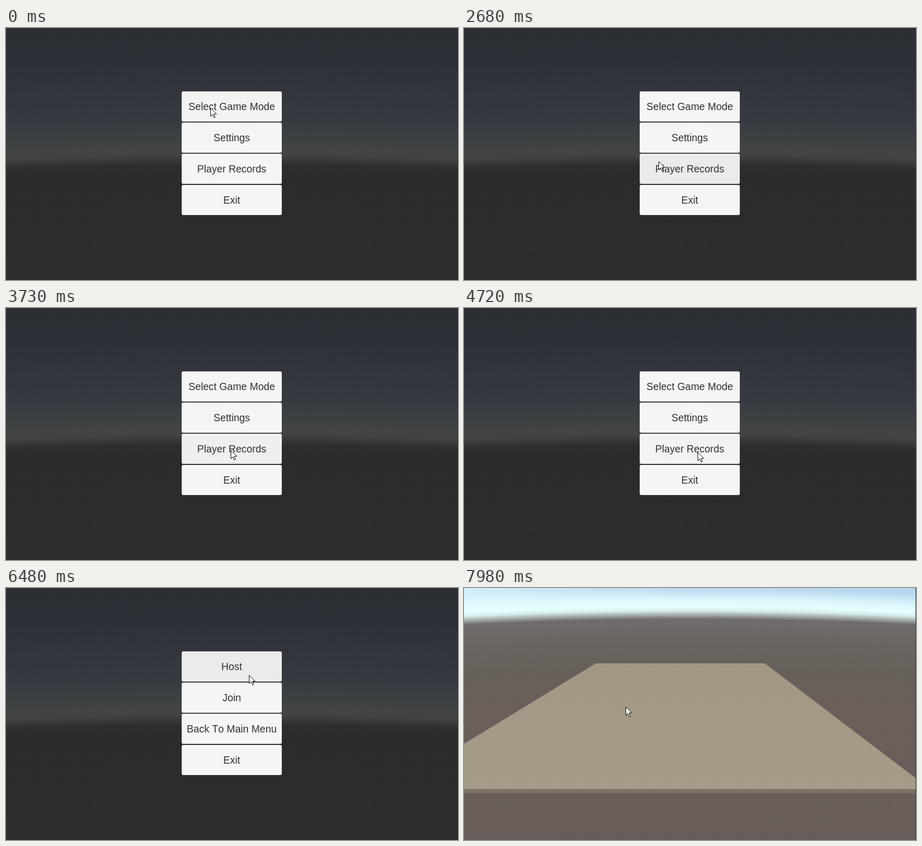
These frames come from a looping animation (867 by 485 pixels, 8000 ms). An HTML page with a canvas:

```html
<!DOCTYPE html>
<html lang="en">
<head>
<meta charset="utf-8">
<title>Game menu</title>
<style>
  html, body { margin: 0; width: 100%; height: 100%; overflow: hidden; background: #2c2b2b; }
  canvas { display: block; }
</style>
</head>
<body>
<canvas id="stage" width="867" height="485"></canvas>
<script>
const W = 867, H = 485, LOOP = 8000;
const FIRST_MOVE = 370, STEP = 76;
const ctx = document.getElementById('stage').getContext('2d');

const BUTTON = { x: 337, y: 122, w: 192, h: 58, pitch: 60.1 };
const MAIN = ['Select Game Mode', 'Settings', 'Player Records', 'Exit'];
const MODES = ['Host', 'Join', 'Back To Main Menu', 'Exit'];
const panel = title => [null, title, 'Back To Main Menu', null];

// The step at which a screen opens and its buttons (no buttons = game scene).
const SCREENS = [
  { opened: 0, labels: MAIN },
  { opened: 2, labels: MODES },
  { opened: 29, labels: MAIN },
  { opened: 36, labels: panel('Settings') },
  { opened: 44, labels: MAIN },
  { opened: 52, labels: panel('Player Records') },
  { opened: 58, labels: MAIN },
  { opened: 78, labels: MODES },
  { opened: 85 }
];

// Turning points of the pointer: step, x, y.
const PATH = [
  [0, 392, 153], [9, 405, 147], [19, 434, 228], [23, 440, 329], [31, 373, 256],
  [36, 405, 220], [45, 431, 273], [58, 448, 277], [64, 445, 336], [71, 415, 147],
  [81, 466, 167], [93, 356, 141], [97, 218, 190], [101, 310, 228]
];

const stepAt = t => Math.max(0, Math.floor((t - FIRST_MOVE) / STEP) + 1);
const screenAt = step => SCREENS.filter(s => s.opened <= step).pop();
const buttonTop = i => Math.round(BUTTON.y + i * BUTTON.pitch);
const smooth = k => k * k * (3 - 2 * k);

function pointerAt(step) {
  const next = Math.max(1, PATH.findIndex(p => p[0] >= step));
  const [s0, x0, y0] = PATH[next - 1], [s1, x1, y1] = PATH[next];
  const e = smooth((step - s0) / (s1 - s0));
  return [x0 + (x1 - x0) * e, y0 + (y1 - y0) * e];
}

function isOver(i, step) {
  const [x, y] = pointerAt(step), top = buttonTop(i);
  return x >= BUTTON.x && x <= BUTTON.x + BUTTON.w && y >= top && y <= top + BUTTON.h;
}

// Hover colour fades in and out over three steps.
function hoverLevel(i, step, opened) {
  return [0.2, 0.4, 0.4].reduce((sum, weight, back) =>
    sum + (step - back >= opened && isOver(i, step - back) ? weight : 0), 0);
}

// A vertical gradient whose horizon sinks towards the sides.
function makeBackdrop(sag, stops) {
  const canvas = document.createElement('canvas');
  canvas.width = W;
  canvas.height = H;
  const c = canvas.getContext('2d');
  for (let x = 0; x < W; x++) {
    const shift = sag * (2 * x / W - 1) ** 2;
    const g = c.createLinearGradient(0, shift, 0, H + shift);
    for (const y in stops) g.addColorStop(y / H, stops[y]);
    c.fillStyle = g;
    c.fillRect(x, 0, 1, H);
  }
  return canvas;
}

const menuBackdrop = makeBackdrop(9, {
  0: '#2b2e33', 60: '#2d3037', 180: '#373a41', 228: '#414443',
  244: '#414443', 263: '#2e2d2d', 285: '#2c2b2b', 485: '#2e2c2d'
});

const sceneBackdrop = makeBackdrop(11, {
  0: '#b8d6ee', 22: '#dcf6fd', 36: '#e5ffff', 44: '#d6eaea',
  60: '#706c6c', 110: '#69645f', 160: '#67605a', 230: '#6a5f5b', 485: '#685e59'
});

function fillRect(color, x, y, w, h) {
  ctx.fillStyle = color;
  ctx.fillRect(x, y, w, h);
}

function polygon(points, fill) {
  ctx.beginPath();
  points.forEach(([x, y]) => ctx.lineTo(x, y));
  ctx.closePath();
  ctx.fillStyle = fill;
  ctx.fill();
}

function gradient(x, y, from, to) {
  const g = ctx.createLinearGradient(0, 0, x, y);
  g.addColorStop(0, from);
  g.addColorStop(1, to);
  return g;
}

function drawScene() {
  ctx.drawImage(sceneBackdrop, 0, 0);
  // The sky is brighter on the left.
  fillRect(gradient(W / 2, 0, 'rgba(229,255,255,.6)', 'rgba(229,255,255,0)'), 0, 0, W, 45);
  polygon([[253, 145], [577, 145], [W, 366.5], [W, 387], [0, 387], [0, 300]],
    gradient(0, H, '#9d9581', '#a79f8b'));
  fillRect('#7c7363', 0, 387, W, 8);
  fillRect('#5d5b5c', 0, H - 2, W, 2);
  fillRect('#3c3c3c', W - 1, 0, 1, H);
}

function drawMenu(labels, opened, step) {
  ctx.drawImage(menuBackdrop, 0, 0);
  fillRect('#2a2a2b', W - 1, 0, 1, H);
  ctx.font = '19.4px "Liberation Sans", Arial, sans-serif';
  ctx.fontKerning = 'none';
  ctx.textAlign = 'center';
  labels.forEach((label, i) => {
    if (!label) return;
    const shade = Math.round(245 - 10 * hoverLevel(i, step, opened));
    ctx.fillStyle = `rgb(${shade},${shade},${shade})`;
    ctx.beginPath();
    ctx.roundRect(BUTTON.x, buttonTop(i), BUTTON.w, BUTTON.h, 3);
    ctx.fill();
    ctx.fillStyle = '#323232';
    ctx.fillText(label, BUTTON.x + BUTTON.w / 2, buttonTop(i) + 36);
  });
}

function drawPointer([x, y]) {
  ctx.save();
  ctx.translate(Math.round(x) + 0.5, Math.round(y) + 1);
  polygon([[0, 0], [0, 16], [3.7, 12.5], [6.3, 18.5], [8.7, 17.5], [6.2, 11.5], [11.3, 11.3]], '#fff');
  ctx.strokeStyle = '#000';
  ctx.stroke();
  ctx.restore();
}

function draw(t) {
  const step = stepAt(t), { opened, labels } = screenAt(step);
  if (labels) drawMenu(labels, opened, step);
  else drawScene();
  drawPointer(pointerAt(step));
}

const start = performance.now();
function tick() {
  draw((performance.now() - start) % LOOP);
  requestAnimationFrame(tick);
}
tick();
</script>
</body>
</html>
```
